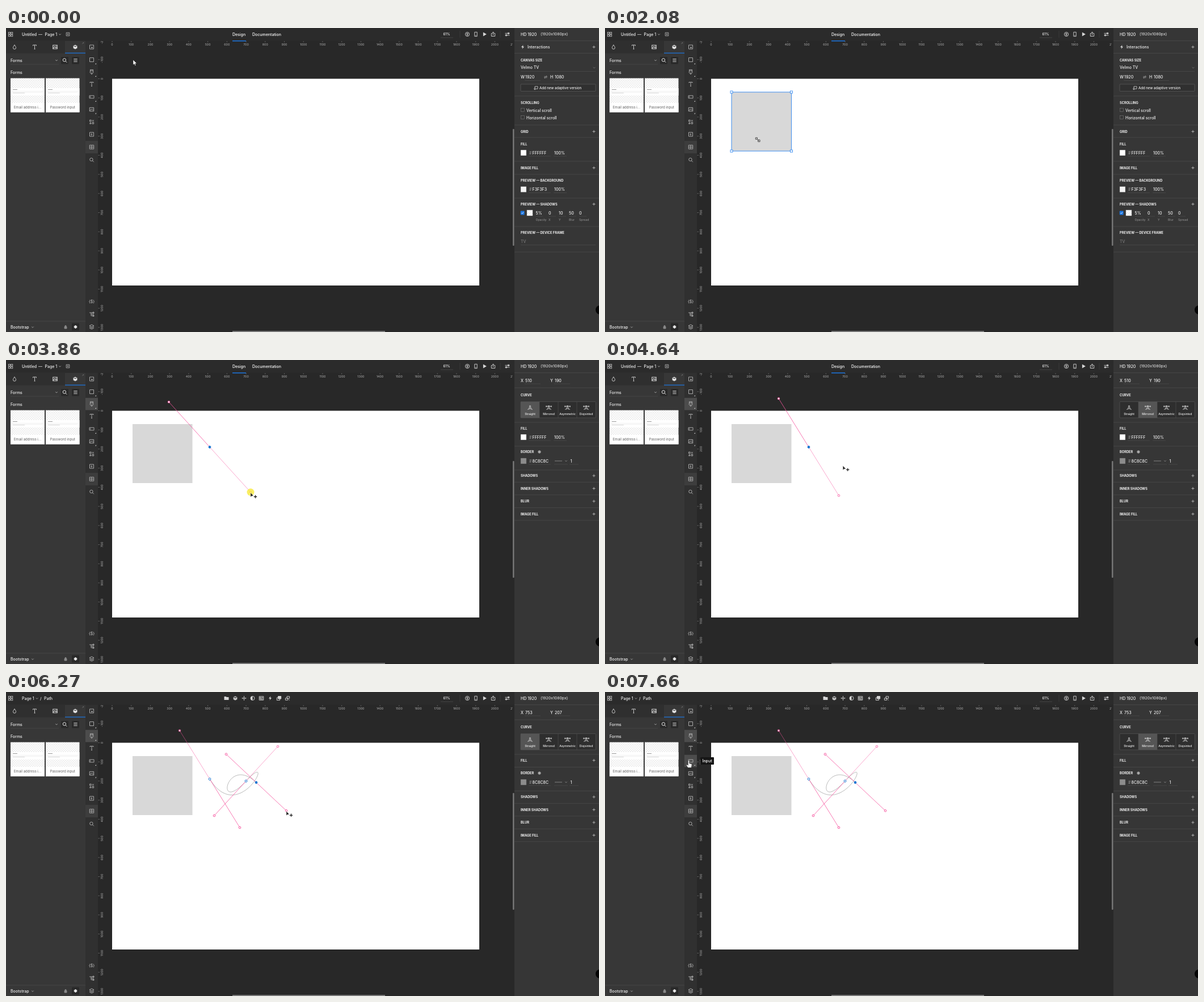
Write an HTML page that moves like this. It is 1045 by 536 pixels and loops after 7.99 s.

```html
<!DOCTYPE html>
<html lang="en">
<head>
<meta charset="utf-8">
<title>Design editor: drawing a path</title>
<style>
html, body { margin: 0; width: 100%; height: 100%; overflow: hidden; background: #282828; }
svg { display: block; width: 100vw; height: 100vh; font-family: Inter, "Open Sans", sans-serif; font-weight: 500; cursor: default; }
</style>
</head>
<body>
<svg id="stage" viewBox="0 0 1045 536">
  <defs>
    <pattern id="check" width="4" height="4" patternUnits="userSpaceOnUse">
      <path d="M0 0h4v4h-4z" fill="#fdfdfd"/><path d="M0 0h2v2h-2zM2 2h2v2h-2z" fill="#efefef"/>
    </pattern>
    <clipPath id="view"><path d="M162 23H893V536H162z"/></clipPath>
  </defs>
</svg>
<script>
const LOOP = 7990;
const root = document.getElementById('stage');

// ---------- drawing helpers ----------
function el(tag, attrs, parent = root) {
  const node = document.createElementNS('http://www.w3.org/2000/svg', tag);
  set(node, attrs);
  return parent.appendChild(node);
}
function set(node, attrs) {
  for (const k in attrs) node.setAttribute(k, attrs[k]);
}
const group = (parent = root) => el('g', {}, parent);
const show = (node, on) => set(node, { visibility: on ? 'visible' : 'hidden' });
const rect = (p, x, y, width, height, fill, more = {}) => el('rect', { x, y, width, height, fill, ...more }, p);
const rule = (p, x1, x2, y, stroke = '#4b4b4b') => el('path', { d: `M${x1} ${y}H${x2}`, stroke, 'stroke-width': .8 }, p);
function text(p, x, y, str, size = 7, fill = '#f2f2f2', more = {}) {
  const node = el('text', { x, y: y + size * .36, 'font-size': size, fill, ...more }, p);
  node.textContent = str;
  return node;
}
const centred = { 'text-anchor': 'middle' };
function icon(p, x, y, d, more = {}) {
  return el('path', { d, transform: `translate(${x} ${y})`, fill: 'none', stroke: '#d6d6d6', 'stroke-width': .9, ...more }, p);
}
const solid = { fill: '#d6d6d6', stroke: 'none' };
const chevron = (p, x, y, stroke = '#aaa') => icon(p, x, y, 'M-1.8 -.9L0 .9L1.8 -.9', { stroke });
const plus = (p, y) => icon(p, 1036, y, 'M-2.5 0H2.5M0 -2.5V2.5', { 'stroke-width': .7 });

const ICON = {
  square: 'M-3.5 -3.5H3.5V3.5H-3.5z',
  search: 'M2.1 -.6A2.7 2.7 0 1 1 -3.3 -.6A2.7 2.7 0 1 1 2.1 -.6M1.4 1.4L3.8 3.8',
  image: 'M-3.7 -3.2H3.7V3.2H-3.7zM-3.5 2.5L-.8 -.6L1 1.2L2 .2L3.6 2.2M1.4 -1.6h1',
  bolt: 'M1 -3.8L-2.6 .6H-.2L-1 3.8L2.6 -.8H.3z',
  letter: 'M-3 -2V-3.5H3V-2M0 -3.5V3.6M-1 3.6H1',
  pen: 'M-2.5 -4H2.5V-2H-2.5zM-2.5 -2L-2.8 1L0 4.2L2.8 1L2.5 -2M0 4V.6',
  hex: 'M0 -3.8L3.4 -1.9V1.9L0 3.8L-3.4 1.9V-1.9zM-3 -1.7L0 0L3 -1.7',
  gear: 'M2 0A2 2 0 1 1 -2 0A2 2 0 1 1 2 0M0 -3V3M-3 0H3M-2.1 -2.1L2.1 2.1M-2.1 2.1L2.1 -2.1'
};

// ---------- backgrounds, rulers and artboard ----------
rect(root, 0, 0, 1045, 536, '#282828');
const view = el('g', { 'clip-path': 'url(#view)' });
for (let i = -2; i <= 21; i++) {
  const x = 187 + 33.72 * i, y = 89.5 + 33.72 * i, label = String(i * 100);
  if (i >= 0) {
    text(view, x, 29.5, label, 5.2, '#a0a0a0', centred);
    el('path', { d: `M${x} 23v2.2`, stroke: '#777', 'stroke-width': .7 }, view);
  }
  if (i < 14) {
    text(view, 0, 0, label, 5.2, '#a0a0a0', { ...centred, transform: `translate(169 ${y}) rotate(-90)` });
    rule(view, 162.5, 165, y, '#777');
  }
}
rect(root, 187, 89.5, 647, 364.5, '#fff');
rect(root, 0, 0, 896, 22.5, '#2b2b2b');
rect(root, 893, 178, 2.6, 206, '#757575', { rx: 1.2 });
rect(root, 399, 534, 269, 2, '#777');

// ---------- left panel ----------
rect(root, 0, 22.5, 140, 513.5, '#373737');
rect(root, 0, 22.5, 104, 22, '#2f2f2f');
rect(root, 104, 43.6, 36, 1.2, '#1b75e0');
icon(root, 15, 33.5, 'M0 -3.8C1 -2 2.5 -.5 2.5 1.3A2.5 2.5 0 0 1 -2.5 1.3C-2.5 -.5 -1 -2 0 -3.8z');
icon(root, 50.5, 33.5, ICON.letter);
icon(root, 86.5, 33.5, ICON.image, { 'stroke-width': 1.1 });
icon(root, 122, 33.5, ICON.hex, { fill: '#eee', stroke: '#888', 'stroke-width': .5 });
icon(root, 135.5, 27, 'M-1.2 1.2L1.2 -1.2M0 -1.2H1.2V0', { stroke: '#888', 'stroke-width': .6 });
text(root, 8, 57, 'Forms');
chevron(root, 89, 57);
rule(root, 8, 93, 64);
rect(root, 97, 51, 13, 12.5, '#292929', { rx: 1 });
rect(root, 116, 51, 13, 12.5, '#292929', { rx: 1 });
icon(root, 103.5, 57, ICON.search, { stroke: '#fff' });
icon(root, 122.5, 57, 'M-3.2 -2.4H3.2M-3.2 0H3.2M-3.2 2.4H3.2');
text(root, 8, 78.5, 'Forms');
function card(x, w, label) {
  rect(root, x, 88.5, w, 60, 'url(#check)');
  rect(root, x, 106, w, 13, '#fff');
  rect(root, x, 132, w, 16.5, '#fff');
  rect(root, x + 4, 108, 8, 1, '#999');
  rect(root, x + 4, 111.3, w - 8, 2.4, '#fff', { stroke: '#ddd', 'stroke-width': .4 });
  rect(root, x + 4, 114.5, w * .35, .6, '#bbb');
  text(root, x + w / 2, 140, label, 6, '#777', centred);
}
card(8, 60, 'Email address i...');
card(70, 59.5, 'Password input');
rule(root, 0, 140, 517);
text(root, 8, 527, 'Bootstrap');
chevron(root, 47, 527.5);
icon(root, 105, 527, 'M-2 -.3H2V3H-2zM-1.2 -.3V-1.4A1.2 1.2 0 0 1 1.2 -1.4V-.3', { fill: '#888', stroke: '#888' });
rect(root, 116, 520.5, 13, 13, '#292929', { rx: 1 });
icon(root, 122.5, 527, ICON.gear, { stroke: '#fff' });

// ---------- tool strip ----------
rect(root, 140, 22.5, 22, 513.5, '#303030');
rect(root, 140, 199, 22, 22, '#3d3d3d');
const toolMark = () => rect(root, 140, 0, 22, 21.5, '#4c4c4c');
const activeMark = toolMark(), hoverMark = toolMark();
const tools = [
  [33.5, ICON.square + 'M-1 1H2M.5 -.5V2.5'], [56, ICON.square], [77.5, ICON.pen], [99, ICON.letter],
  [121.5, 'M-4 -2.3H4V2.3H-4zM-2.4 -1V1'], [143.5, ICON.image],
  [165.5, 'M-3.5 -3.3h2.6v2.6h-2.6zM1 -3.3L3.6 -.7M3.6 -3.3L1 -.7M-3.5 3.4L-2.2 .9L-.9 3.4zM1 .9h2.6v2.6h-2.6z'],
  [187.5, ICON.square + 'M.5 -2L-1.2 .3H1L-.3 2.2'], [210, 'M-3.7 -3.4H3.7V3.2H-3.7zM-3.7 0H3.7M0 -3.4V3.2'],
  [232.5, ICON.search], [504.5, 'M-4 -2.5H3.5M-1 -2.5V2.8H3.5M-1 .2H3.5M2 -3.5h2v2h-2zM2 1.8h2v2h-2z'],
  [527, 'M0 -4L4 -2L0 0L-4 -2zM-4 0L0 2L4 0M-4 2L0 4L4 2']
];
for (const [y, d] of tools) icon(root, 151, y, d, { stroke: '#b5b5b5' });
text(root, 151, 482, '{$}', 7, '#b5b5b5', centred);
for (const y of [63, 85, 129, 150.5]) icon(root, 158, y, 'M1 -1V1H-1z', solid);
const tooltip = group();
rect(tooltip, 168, 115, 24, 13, '#161616', { rx: 1 });
text(tooltip, 180, 121.7, 'Input', 7, '#fff', centred);

// ---------- top bar ----------
for (const x of [4.5, 8.8]) for (const y of [7.5, 11.8]) rect(root, x, y, 3, 3, 'none', { stroke: '#ccc', 'stroke-width': .8 });
text(root, 776.5, 11.2, '61%', 6, '#f2f2f2', centred);
rule(root, 766, 788, 17);
for (const x of [800, 871]) el('path', { d: `M${x} 5V17`, stroke: '#444', 'stroke-width': .6 });
icon(root, 813, 11, 'M3.6 0A3.6 3.6 0 1 1 -3.6 0A3.6 3.6 0 1 1 3.6 0M-2 -.8H2M0 -2.2V1L-1.2 2.6M0 1L1.2 2.6');
icon(root, 828, 11, 'M-2.2 -3.7H2.2V3.7H-2.2zM-.6 2.4H.6');
icon(root, 843.5, 11, 'M-2.6 -3.6L3.4 0L-2.6 3.6z', solid);
icon(root, 858.5, 11, 'M-1.5 -1.5H-3.2V3.5H3.2V-1.5H1.5M0 1.5V-3.8M-1.7 -2.3L0 -4L1.7 -2.3');
icon(root, 883.5, 11, 'M-4 -1.6H4M-4 1.8H4M1 -2.7H3V-.5H1zM-3 .7H-1V2.9H-3z');

const pageBar = group();
text(pageBar, 28, 11, 'Untitled');
text(pageBar, 57, 11, '—');
text(pageBar, 68.5, 11, 'Page 1');
chevron(pageBar, 95, 11.3);
icon(pageBar, 109, 11, 'M-2.8 -2.8H2.8V2.8H-2.8zM-1.4 0H1.4M0 -1.4V1.4', { 'stroke-width': .7 });
text(pageBar, 410.5, 11, 'Design', 7, '#fff', centred);
rect(pageBar, 399, 22, 24, 1.5, '#1b75e0');
const docTab = text(pageBar, 459.5, 11, 'Documentation', 7, '#fff', centred);

const itemBar = group();
text(itemBar, 28, 11, 'Page 1');
chevron(itemBar, 54.5, 11.3);
text(itemBar, 60, 11, '/');
const itemName = text(itemBar, 67, 11, 'Path');
icon(itemBar, 388.5, 11, 'M-4 -3H-.8L.2 -2H4V3H-4z', solid);
icon(itemBar, 404, 11, ICON.hex, { fill: '#ccc', stroke: '#555', 'stroke-width': .5 });
icon(itemBar, 419.5, 11, 'M0 -4V4M-4 0H-1.3M4 0H1.3M-2.4 -1.2L-1.2 0L-2.4 1.2M2.4 -1.2L1.2 0L2.4 1.2');
icon(itemBar, 434.5, 11, 'M0 -3.5A3.5 3.5 0 0 1 0 3.5A3.5 3.5 0 0 1 0 -3.5');
icon(itemBar, 434.5, 11, 'M0 -3.5A3.5 3.5 0 0 0 0 3.5z', solid);
icon(itemBar, 450, 11, 'M-3.8 -3.2H3.8V3.2H-3.8zM-2.5 -1.5H0V.7H-2.5zM1 -1.5H2.8M1 0H2.8M-2.5 2H2.8');
icon(itemBar, 465.5, 11, ICON.bolt, solid);
icon(itemBar, 481, 11, 'M-1.5 -3.5H3.7V1H-1.5zM-1.5 -1H-3.7V3.5H1.5V1');
icon(itemBar, 481, 11, 'M-1.5 -3.5H3.7V1H-1.5z', solid);
icon(itemBar, 496, 11, 'M-1 -3.3H3.6V.2H-1zM-3.6 -.2H.6V3.3H-3.6zM2 2L3.6 3.6');

// ---------- right panel ----------
rect(root, 896, 0, 149, 536, '#363636');
text(root, 907, 11, 'HD 1920');
text(root, 942, 11, '(1920x1080px)', 6.8, '#d5d5d5');

const divider = (p, y) => rule(p, 896, 1045, y);
const heading = (p, y, s) => text(p, 907, y, s, 5.7, '#f2f2f2', { 'font-weight': 700 });
function addRow(p, y, s) {
  heading(p, y, s);
  plus(p, y);
}
function field(p, x, y, value, from, to) {
  rule(p, from, to, y + 6);
  return text(p, x, y, value);
}
function pair(p, y, a, av, b, bv) {
  text(p, 907, y, a);
  text(p, 959, y, b);
  return [field(p, 915, y, av, 914, 942), field(p, 967, y, bv, 966, 994)];
}
function color(p, y, hex, alpha) {
  rect(p, 907, y - 5, 10, 10, '#' + hex, { stroke: '#555', 'stroke-width': .4 });
  text(p, 922, y, '#', 7, '#8a8a8a');
  field(p, 927.5, y, hex, 921, 960);
  if (alpha) field(p, 966, y, alpha, 965, 988);
}
function border(p, y) {
  heading(p, y, 'BORDER');
  icon(p, 940, y, ICON.gear, { 'stroke-width': .6 });
  color(p, y + 16, '8C8C8C');
  rule(p, 967, 980, y + 16, '#999');
  chevron(p, 987, y + 16, '#888');
  rule(p, 966, 990, y + 22);
  field(p, 994.5, y + 16, '1', 993, 1009);
}
function effects(p, y) {
  ['SHADOWS', 'INNER SHADOWS', 'BLUR', 'IMAGE FILL'].forEach((s, i) => {
    addRow(p, y + i * 22.5, s);
    divider(p, y + i * 22.5 + 11.3);
  });
}

const pagePanel = group();
icon(pagePanel, 910.5, 33.5, ICON.bolt, solid);
text(pagePanel, 919, 33.5, 'Interactions');
plus(pagePanel, 33.5);
for (const y of [22.5, 44.5, 120, 171, 193, 235, 258, 300, 350, 395]) divider(pagePanel, y);
heading(pagePanel, 56.5, 'CANVAS SIZE');
text(pagePanel, 907, 69.5, 'Velmo TV');
chevron(pagePanel, 1036.5, 70, '#777');
rule(pagePanel, 907, 1039, 76.5);
pair(pagePanel, 86.5, 'W', '1920', 'H', '1080');
icon(pagePanel, 951, 86.5, 'M-2.5 -1H2.5L1 -2.3M2.5 1H-2.5L-1 2.3', { 'stroke-width': .6 });
rect(pagePanel, 907, 99, 132, 12.5, '#303030', { stroke: '#5c5c5c', 'stroke-width': .7, rx: 1 });
icon(pagePanel, 934, 105.5, 'M-2 -2.5H3V1.8H0M-2 -2.5V0M-3 .5H-1V3H-3z', { 'stroke-width': .8 });
text(pagePanel, 940, 105.5, 'Add new adaptive version', 6);
heading(pagePanel, 132, 'SCROLLING');
[[144.5, 'Vertical scroll'], [157.5, 'Horizontal scroll']].forEach(([y, s]) => {
  rect(pagePanel, 907.3, y - 3.2, 6, 6, 'none', { stroke: '#777', 'stroke-width': .6 });
  text(pagePanel, 917, y + .7, s, 6.9);
});
addRow(pagePanel, 182.5, 'GRID');
heading(pagePanel, 204.5, 'FILL');
color(pagePanel, 220, 'FFFFFF', '100%');
addRow(pagePanel, 246.5, 'IMAGE FILL');
heading(pagePanel, 268.5, 'PREVIEW — BACKGROUND');
color(pagePanel, 284.5, 'F3F3F3', '100%');
addRow(pagePanel, 310.5, 'PREVIEW — SHADOWS');
rect(pagePanel, 906.8, 322.6, 6.8, 6.8, '#1b75e0', { rx: 1 });
icon(pagePanel, 910.2, 326, 'M-1.8 0L-.5 1.3L1.8 -1.3', { stroke: '#fff', 'stroke-width': .8 });
rect(pagePanel, 918, 321, 10, 10, 'url(#check)', { stroke: '#bbb', 'stroke-width': .4 });
[[933.5, '5%', 'Opacity'], [956, '0', 'X'], [974, '10', 'Y'], [992, '50', 'Blur'], [1010, '0', 'Spread']]
  .forEach(([x, v, s]) => {
    field(pagePanel, x, 326, v, x, x + 13);
    text(pagePanel, x, 338, s, 5.1, '#8c8c8c');
  });
heading(pagePanel, 360.5, 'PREVIEW — DEVICE FRAME');
text(pagePanel, 907, 376, 'TV', 7, '#777');
rule(pagePanel, 907, 1039, 382.5);

const boxPanel = group();
divider(boxPanel, 22.5);
pair(boxPanel, 36, 'X', '107', 'Y', '70');
pair(boxPanel, 54, 'W', '313', 'H', '309');
divider(boxPanel, 68);
heading(boxPanel, 78, 'FILL');
color(boxPanel, 94, 'D8D8D8', '100%');
divider(boxPanel, 110);
addRow(boxPanel, 120.5, 'BORDER');
divider(boxPanel, 132);
effects(boxPanel, 143);

const pointPanel = group();
divider(pointPanel, 22.5);
const [pointX, pointY] = pair(pointPanel, 36, 'X', '', 'Y', '');
divider(pointPanel, 49);
heading(pointPanel, 62, 'CURVE');
rect(pointPanel, 907, 73.5, 132.5, 28.5, '#2e2e2e', { stroke: '#555', 'stroke-width': .7, rx: 1 });
const modeMark = rect(pointPanel, 907, 73.5, 33, 28.5, '#555');
['Straight', 'Mirrored', 'Asymmetric', 'Disjointed'].forEach((s, i) => {
  const x = 923.5 + i * 33;
  if (i) el('path', { d: `M${x - 16.5} 73.5v28.5`, stroke: '#555', 'stroke-width': .6 }, pointPanel);
  icon(pointPanel, x, 84, 'M-4.5 3.5Q-1.5 3 -.8 -1.5M4.5 3.5Q1.5 3 .8 -1.5M-2 3.5L0 .5L2 3.5', { 'stroke-width': .8 });
  icon(pointPanel, x, 84, 'M-1 -3.5H1V-1.5H-1z' + (i ? 'M-5 -3h1.6v1.6h-1.6zM3.4 -3h1.6v1.6h-1.6zM-4 -2.4H4' : ''), { 'stroke-width': .7 });
  text(pointPanel, x, 95.3, s, 5, '#f2f2f2', centred);
});
divider(pointPanel, 110);
const filled = group(pointPanel), unfilled = group(pointPanel);
heading(filled, 120.5, 'FILL');
color(filled, 136, 'FFFFFF', '100%');
divider(filled, 152);
border(filled, 162);
divider(filled, 194);
effects(filled, 204);
addRow(unfilled, 120.5, 'FILL');
divider(unfilled, 132.5);
border(unfilled, 143);
divider(unfilled, 174.5);
effects(unfilled, 185);

el('circle', { cx: 1047, cy: 497, r: 8, fill: '#050505' });

// ---------- drawn box and path ----------
const BOX = { x: 223, y: 113, w: 105.5, h: 104 };
const box = rect(root, BOX.x, BOX.y, 0, 0, '#d8d8d8', { 'stroke-width': 1 });
const grips = group();
for (const x of [BOX.x, BOX.x + BOX.w]) for (const y of [BOX.y, BOX.y + BOX.h])
  rect(grips, x - 2, y - 2, 4, 4, '#fff', { stroke: '#3d8ef0', 'stroke-width': .9 });

const curve = el('path', { fill: 'none', stroke: '#8c8c8c', 'stroke-width': .6 });
const PINK = '#f7559f';
// press: pointer goes down, release: pointer goes up, settle: curve mode becomes mirrored
const points = [
  { x: 359, y: 153.5, press: 3400, release: 4490, settle: 4490, label: ['510', '190'] },
  { x: 423, y: 157, press: 4800, release: 5410, settle: 5410, label: ['700', '200'] },
  { x: 441, y: 159.5, press: 5930, release: 6270, settle: 6360, label: ['753', '207'] }
];
for (const p of points) {
  p.g = group();
  const arm = () => el('path', { stroke: PINK, 'stroke-width': .8 }, p.g);
  const knob = () => el('circle', { r: 1.8, fill: '#fff', stroke: PINK, 'stroke-width': 1 }, p.g);
  p.arms = [arm(), arm()];
  p.knobs = [knob(), knob()];
  p.dot = el('circle', { cx: p.x, cy: p.y, r: 1.9, stroke: '#1976d2', 'stroke-width': 1 }, p.g);
}

// ---------- pointer ----------
const halo = el('circle', { r: 6.5, fill: '#f8ea3c', opacity: .8 });
const ARROW = 'M0 0V9.2L2.1 7.3L3.6 10.4L5 9.7L3.6 6.8L6.5 6.5z';
const cursors = { arrow: group(), hand: group(), cross: group(), resize: group(), pen: group() };
icon(cursors.arrow, 0, 0, ARROW, { fill: '#fff', stroke: '#111', 'stroke-width': .5 });
icon(cursors.hand, 0, 0, 'M-1.2 .9A1.2 1.2 0 0 1 1.2 .9V5L4.6 5.8Q5.8 6.2 5.6 7.6L4.8 12.8H-1.4L-4 8.6Q-4.4 7 -2.8 7.2L-1.2 8.4z',
  { fill: '#fff', stroke: '#111', 'stroke-width': .6 });
icon(cursors.cross, 0, 0, 'M-3.5 .5H3.5M0 -3V4M3.5 -6.7H8V-2.2H3.5z', { stroke: '#222' });
icon(cursors.resize, 0, 0, 'M-3.7 -2.2V-3.2H-.6V-.3H-3.7zM-.6 -.3L2 2M.7 .8H4V4H.7z', { stroke: '#222', 'stroke-width': .8 });
icon(cursors.pen, 0, 1, 'M0 0V7.5L2 5.8L5.2 5.5z', { fill: '#1c1c1c', stroke: '#fff', 'stroke-width': .4 });
icon(cursors.pen, 8.5, 8, 'M-2.7 0H2.7M0 -2.7V2.7', { stroke: '#222', 'stroke-width': 1.3 });

// [time, x, y] of the pointer
const track = [
  [70, 224, 56], [680, 150, 36], [910, 150, 36], [1220, 215, 104], [1300, 215, 104], [1380, 223, 113],
  [1690, 328.5, 217], [1770, 328.5, 217], [2080, 269, 196.5], [2160, 269, 196.5], [2550, 151, 78], [2700, 150, 76],
  [2930, 150, 76], [3320, 359, 153.5], [3400, 359, 153.5], [3710, 430, 234], [3860, 431, 233], [4020, 431, 233],
  [4021, 432, 232], [4180, 432, 232], [4340, 412, 239], [4490, 412, 239], [4740, 423, 157], [4800, 423, 157],
  [5180, 367, 218], [5500, 367, 218], [5860, 441, 159.5], [5930, 441, 159.5], [6270, 494, 209.3], [6420, 494, 209.3],
  [7280, 151, 120], [7430, 148, 120.5], [7590, 148, 120.5], [7660, 147.5, 120.8]
];
function pointer(t) {
  const i = track.findIndex(k => k[0] > t);
  if (i === 0) return { x: track[0][1], y: track[0][2] };
  const b = i < 0 ? track[track.length - 1] : track[i], a = i < 0 ? b : track[i - 1];
  const span = b[0] - a[0], u = span ? (t - a[0]) / span : 1;
  const k = span > 200 ? u * u * (3 - 2 * u) : u;
  return { x: a[1] + (b[1] - a[1]) * k, y: a[2] + (b[2] - a[2]) * k };
}
function cursorKind(t, x) {
  if (x < 162) return 'hand';
  if (t < 910) return 'arrow';
  if (t < 1770) return 'cross';
  if (t < 2930) return x < 220 ? 'arrow' : 'resize';
  return 'pen';
}
const within = (t, a, b) => t >= a && t < b;

// ---------- frame ----------
function drawPath(t) {
  const placed = points.filter(p => t >= p.press);
  const last = placed[placed.length - 1];
  let d = '';
  placed.forEach((p, i) => {
    const out = pointer(Math.min(t, p.release));
    const inn = { x: 2 * p.x - out.x, y: 2 * p.y - out.y };
    const prev = placed[i - 1];
    d += prev ? `C${prev.out.x} ${prev.out.y} ${inn.x} ${inn.y} ${p.x} ${p.y}` : `M${p.x} ${p.y}`;
    p.out = out;
    const alone = placed.length === 1;
    const alpha = [alone || i === 2 ? 1 : .65, alone ? .65 : 1];
    [inn, out].forEach((h, k) => {
      set(p.arms[k], { d: `M${p.x} ${p.y}L${h.x} ${h.y}`, opacity: alpha[k] });
      set(p.knobs[k], { cx: h.x, cy: h.y, opacity: alpha[k] + (1 - alpha[k]) / 2 });
    });
    set(p.dot, { fill: p === last ? '#1976d2' : '#fff' });
  });
  for (const p of points) show(p.g, placed.includes(p));
  set(curve, { d: d || 'M0 0' });
  if (last) {
    pointX.textContent = last.label[0];
    pointY.textContent = last.label[1];
    set(modeMark, { x: t < last.settle ? 907 : 940 });
  }
  return placed.length;
}

function draw(t) {
  const c = pointer(t);
  const count = drawPath(t);

  const boxChosen = within(t, 2160, 2930);
  show(pageBar, !boxChosen && count < 2);
  show(itemBar, boxChosen || count > 1);
  itemName.textContent = boxChosen ? 'Box' : 'Path';
  set(docTab, { fill: within(t, 910, 1770) ? '#8d8d8d' : '#fff' });
  show(pagePanel, !boxChosen && !count);
  show(boxPanel, boxChosen);
  show(pointPanel, count > 0);
  show(filled, count === 1);
  show(unfilled, count > 1);

  const grow = t >= 1690 ? 1 : 0;
  show(box, t >= 1380);
  set(box, {
    width: grow ? BOX.w : Math.max(0, c.x - BOX.x),
    height: grow ? BOX.h : Math.max(0, c.y - BOX.y),
    stroke: t < 2930 ? '#3d8ef0' : 'none'
  });
  show(grips, within(t, 1770, 2930));

  const drawing = within(t, 910, 1770);
  show(activeMark, drawing || t >= 2930);
  set(activeMark, { y: drawing ? 22.8 : 66.8 });
  const over = c.x < 162 && tools.find(k => Math.abs(k[0] - c.y) <= 11);
  show(hoverMark, !!over);
  if (over) set(hoverMark, { y: over[0] - 10.7 });
  show(tooltip, t >= 7240);

  show(halo, within(t, 1380, 1770) || points.some(p => within(t, p.press, p.release)));
  set(halo, { cx: c.x, cy: c.y });
  const kind = cursorKind(t, c.x);
  for (const k in cursors) show(cursors[k], k === kind);
  set(cursors[kind], { transform: `translate(${c.x} ${c.y})` });
}

const start = performance.now();
function tick() {
  draw((performance.now() - start) % LOOP);
  requestAnimationFrame(tick);
}
tick();
</script>
</body>
</html>
```
